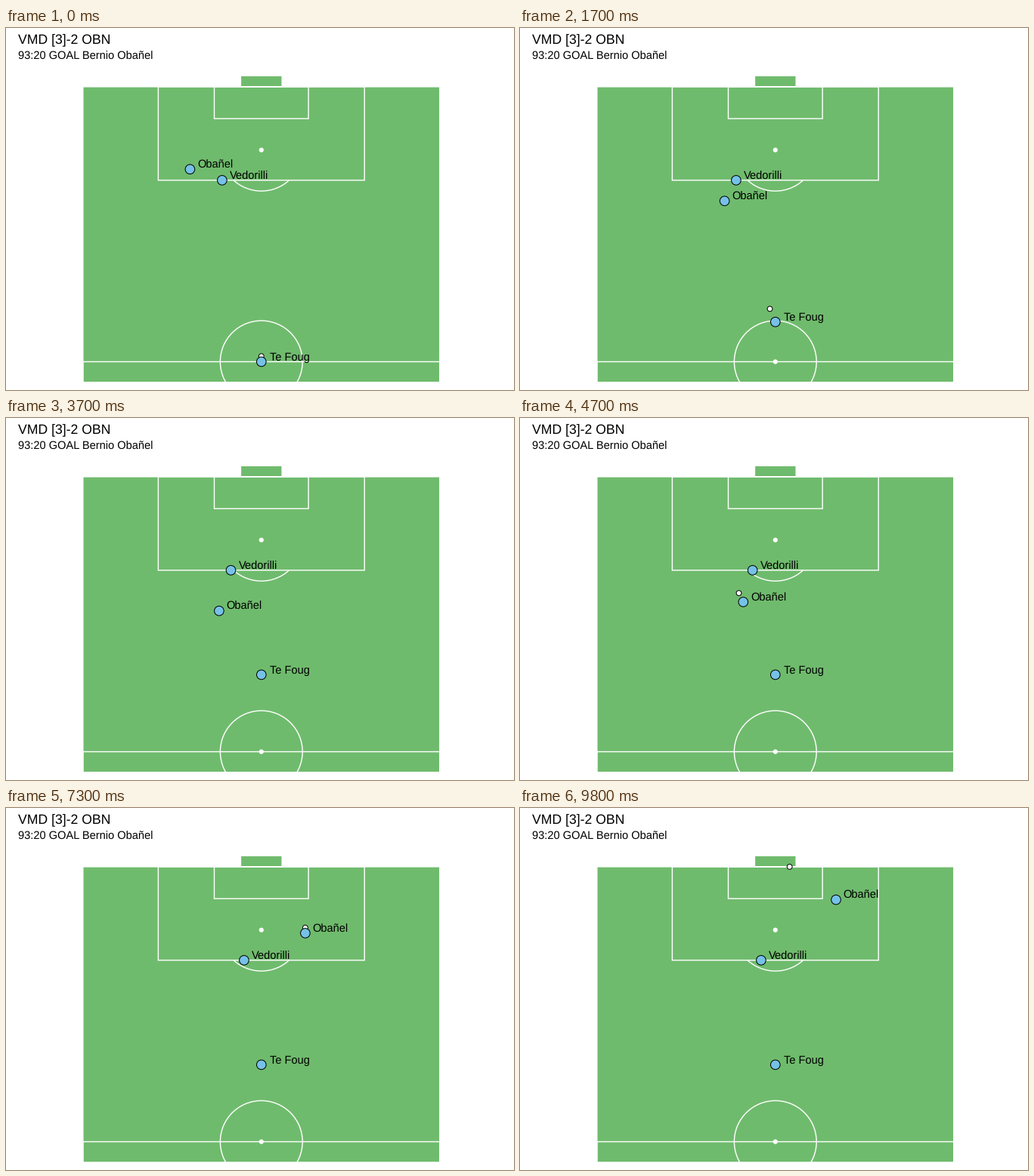
Write a matplotlib script that moves like this. It is 672 px wide and 480 px high and loops after 10000 ms.

```python
import matplotlib.pyplot as plt
from matplotlib.animation import FuncAnimation
from matplotlib.patches import Arc, Circle, Rectangle

W, H = 672, 480
FRAMES, STEP = 100, 14
PX = 0.75  # points per pixel at 96 dpi
GREEN, BLUE = "#6fbb6d", "#76c1e8"

plt.rcParams["font.family"] = "Liberation Sans"
plt.rcParams["text.hinting"] = "none"


def px(x):
    return 337.8 + (x - 50) * 4.72


def py(y):
    return 77.9 + (100 - y) * 7.292


# Positions (across, up the pitch) at each of the eight states
BALL = [(50, 51), (50, 57), (40, 74), (37, 77),
        (46, 83), (62, 88), (64, 94), (54, 100)]
PLAYERS = [
    ("Te Foug", 10.9, [(50, 50), (50, 56)] + [(50, 64)] * 6),
    ("Obañel", 9.5, [(30, 85), (35, 80), (40, 75), (37, 76),
                     (50, 80), (62, 87), (64, 93), (67, 94)]),
    ("Vedorilli", 10.0, [(x, 83) for x in (39, 39, 39, 43, 45, 45, 46, 46)]),
]


def locate(path, i):
    """Linear move between states, with each state held for one extra frame."""
    k = min(max(i - 1, 0) // STEP, len(path) - 2)
    start = k * STEP + (k > 0)
    t = min(max((i - start) / ((k + 1) * STEP - start), 0), 1)
    (x0, y0), (x1, y1) = path[k], path[k + 1]
    return px(x0 + (x1 - x0) * t), py(y0 + (y1 - y0) * t)


fig = plt.figure(figsize=(W / 96, H / 96), dpi=96, facecolor="white")
ax = fig.add_axes([0, 0, 1, 1])
ax.set_xlim(0, W)
ax.set_ylim(H, 0)
ax.axis("off")

panel = Rectangle((102, 50), 471.5, 419, transform=ax.transData)
line = dict(edgecolor="white", linewidth=1.42 * PX, snap=False)


def box(x0, y0, x1, y1, fill="none"):
    patch = Rectangle((px(x0), py(y1)), px(x1) - px(x0), py(y0) - py(y1),
                      facecolor=fill, **line)
    ax.add_patch(patch)
    patch.set_clip_path(panel)


def arc(y, a0=0, a1=360):
    patch = Arc((px(50), py(y)), 108.8, 108.8, theta1=a0, theta2=a1, **line)
    ax.add_patch(patch)
    patch.set_clip_path(panel)


def spot(y):
    ax.add_patch(Circle((px(50), py(y)), 3.1, facecolor="white", linewidth=0))


def marker(radius, color, z):
    return ax.add_patch(Circle((0, 0), radius, facecolor=color,
                               edgecolor="black", linewidth=PX, zorder=z))


# Pitch
box(0, 40, 100, 100, GREEN)
box(0, 40, 100, 50)
box(44.2, 100, 55.8, 102, GREEN)
box(21.1, 83, 78.9, 100)
box(36.8, 94.2, 63.2, 100)
arc(50)
arc(88.5, 48, 132)
spot(50)
spot(88.5)

ax.text(16, 20, "VMD [3]-2 OBN", fontsize=13.2, va="baseline")
ax.text(16, 42, "93:20 GOAL Bernio Obañel", fontsize=11, va="baseline")

ball = marker(3.4, "white", 4)
dots = [marker(6.3, BLUE, 5) for _ in PLAYERS]
labels = [ax.text(0, 0, name, fontsize=11, va="baseline", zorder=6)
          for name, _, _ in PLAYERS]


def update(i):
    ball.center = locate(BALL, i)
    for dot, label, (_, shift, path) in zip(dots, labels, PLAYERS):
        x, y = locate(path, i)
        dot.center = x, y
        label.set_position((x + shift, y - 1.5))
    return [ball, *dots, *labels]


anim = FuncAnimation(fig, update, frames=FRAMES, interval=100,
                     repeat=True, repeat_delay=0, blit=False)
plt.show()
```
